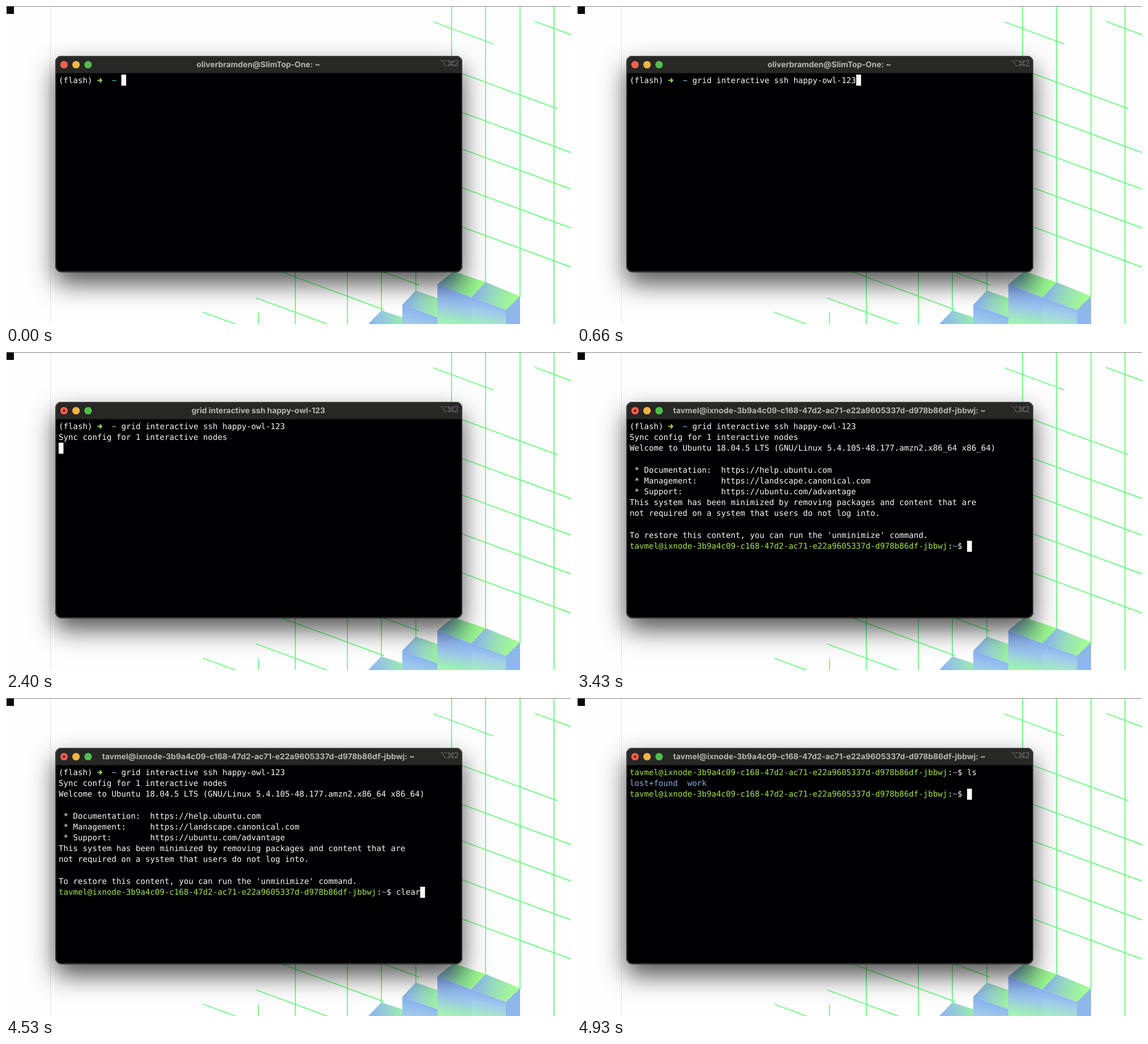
Write an HTML page with a canvas that moves like this. It is 998x561 px and loops after 5460 ms.

```html
<!DOCTYPE html>
<html lang="en">
<head>
<meta charset="utf-8">
<title>Terminal session</title>
<style>
  html, body { margin: 0; width: 100%; height: 100%; overflow: hidden; background: #fefefe; }
  canvas { display: block; }
</style>
</head>
<body>
<canvas id="stage" width="998" height="561"></canvas>
<script>
const W = 998, H = 561, LOOP = 5460;
const LEFT = 93, TOP = 121.4, CELL = 8.515, ROW = 19.2;
const WHITE = '#f8f8f8', LIME = '#a5e545', CYAN = '#5fd3dc', BLUE = '#82addf', GREEN = '#6cfa82';
const MONO = '14.143px "DejaVu Sans Mono", monospace';
const BOLD = '700 13.9px Inter, sans-serif';

const COMMAND = 'grid interactive ssh happy-owl-123';
const HOST = 'tavmel@ixnode-3b9a4c09-c168-47d2-ac71-e22a9605337d-d978b86df-jbbwj';
const WELCOME = [
  'Welcome to Ubuntu 18.04.5 LTS (GNU/Linux 5.4.105-48.177.amzn2.x86_64 x86_64)',
  '',
  ' * Documentation:  https://help.ubuntu.com',
  ' * Management:     https://landscape.canonical.com',
  ' * Support:        https://ubuntu.com/advantage',
  'This system has been minimized by removing packages and content that are',
  'not required on a system that users do not log into.',
  '',
  "To restore this content, you can run the 'unminimize' command."
];

const ctx = document.getElementById('stage').getContext('2d');

function line(c, x1, y1, x2, y2) {
  c.beginPath();
  c.moveTo(x1, y1);
  c.lineTo(x2, y2);
  c.stroke();
}

function disc(c, x, y, r, color) {
  c.fillStyle = color;
  c.beginPath();
  c.arc(x, y, r, 0, Math.PI * 2);
  c.fill();
}

function polygon(c, points, fill) {
  c.fillStyle = fill;
  c.beginPath();
  points.forEach(([x, y]) => c.lineTo(x, y));
  c.closePath();
  c.fill();
}

function blend(c, x1, y1, x2, y2, ...colors) {
  const g = c.createLinearGradient(x1, y1, x2, y2);
  colors.forEach((color, i) => g.addColorStop(i / (colors.length - 1), color));
  return g;
}

function drawGrid(c) {
  c.strokeStyle = GREEN;
  c.lineWidth = 1.8;
  [[787, 0, 100], [847, 0, 490], [908, 0, 514], [968, 0, H], [446, 541, H],
   [511, 460, H], [603, 460, H], [663, 460, 538], [724, 460, 503]]
    .forEach(([x, y1, y2]) => line(c, x, y1, x, y2));

  // Slanted lines: start point and end x on a common slope.
  [[755, 28, 861], [934, 27, W], [790, 113.5, 974], [790, 182, W], [790, 246.5, W],
   [790, 315, W], [790, 384, W], [470, 463, 668], [442, 515, 570], [348, 540, 408], [650, 463, 730]]
    .forEach(([x, y, end]) => line(c, x, y, end, y + (end - x) * 0.368));
}

function drawCubes(c) {
  polygon(c, [[640, H], [663, 537], [700, 549], [700, H]],
    blend(c, 645, 561, 700, 548, '#8eb6ee', '#96cfd6', '#9beeac'));
  polygon(c, [[700, 527], [724, 502], [762, 515], [762, 549]],
    blend(c, 704, 526, 762, 526, '#88b3ee', '#98d7cc', '#9ef2a2'));
  polygon(c, [[700, 527], [762, 549], [762, H], [700, H]],
    blend(c, 725, 530, 718, 561, '#86aff0', '#a0ccea'));
  polygon(c, [[762, 491], [790, 468], [847, 487], [822, 514]],
    blend(c, 768, 485, 838, 495, '#85b9d8', '#8de29c', '#9cfc88'));
  polygon(c, [[762, 491], [822, 514], [822, H], [762, H]],
    blend(c, 794, 498, 783, 561, '#86abf1', '#9bc5ed', '#a3f4b0'));
  polygon(c, [[822, 514], [847, 487], [908, 512], [883, 536]],
    blend(c, 832, 501, 896, 522, '#8ab7e9', '#98deb7', '#a2fb94'));
  polygon(c, [[822, 514], [883, 536], [883, H], [822, H]],
    blend(c, 852, 520, 844, 561, '#88aef0', '#a2cdea', '#a5e9c5'));
  polygon(c, [[883, 536], [908, 512], [908, H], [883, H]],
    blend(c, 900, 516, 892, 561, '#8ab9e3', '#91b6ef'));
}

function drawShortcut(c) {
  c.strokeStyle = '#6e6e6d';
  c.lineWidth = 1.1;
  c.beginPath();
  c.moveTo(767.5, 96.5);
  c.lineTo(771, 96.5);
  c.lineTo(775.5, 105.5);
  c.lineTo(779, 105.5);
  c.moveTo(774, 96.5);
  c.lineTo(779, 96.5);
  c.stroke();
  c.strokeRect(784, 99.2, 3.8, 3.8);
  for (const sx of [-1, 1]) for (const sy of [-1, 1]) {
    c.beginPath();
    c.arc(785.9 + sx * 3.5, 101.1 + sy * 3.5, 1.6, 0, Math.PI * 2);
    c.stroke();
  }
  c.fillStyle = '#6e6e6d';
  c.font = '14px Inter, sans-serif';
  c.fillText('2', 791.5, 106);
}

function drawWindow(c) {
  const frame = (inset, r) => {
    c.beginPath();
    c.roundRect(87 + inset, 88 + inset, 719 - 2 * inset, 381.5 - 2 * inset, r);
  };
  c.save();
  c.shadowColor = 'rgba(0,0,0,.68)';
  c.shadowBlur = 44;
  c.shadowOffsetY = 20;
  c.fillStyle = '#000';
  frame(0, 11);
  c.fill();
  c.restore();

  c.save();
  frame(0, 11);
  c.clip();
  c.fillStyle = '#000002';
  c.fillRect(87, 88, 719, 382);
  c.fillStyle = '#272726';
  c.fillRect(87, 88, 719, 30.5);
  c.restore();
  c.strokeStyle = '#4b4b4b';
  c.lineWidth = 1.2;
  frame(1, 10);
  c.stroke();

  disc(c, 102.5, 103.5, 6.6, '#ed6150');
  disc(c, 123.7, 103.5, 6.6, '#f3b442');
  disc(c, 145, 103.5, 6.6, '#51bd4b');
  drawShortcut(c);
}

function makeBackdrop() {
  const canvas = document.createElement('canvas');
  canvas.width = W;
  canvas.height = H;
  const c = canvas.getContext('2d');
  c.fillStyle = '#fefefe';
  c.fillRect(0, 0, W, H);
  drawGrid(c);
  drawCubes(c);
  c.fillStyle = '#e3e3e3';
  c.fillRect(78, 0, 1, H);
  c.fillStyle = '#838383';
  c.fillRect(0, 0, W, 1);
  c.fillStyle = '#0a0a0a';
  c.fillRect(1, 1, 13, 13);
  drawWindow(c);
  return canvas;
}

function typed(text, t, start, step) {
  return text.slice(0, Math.max(0, Math.floor((t - start) / step) + 1));
}

const plain = text => [[WHITE, text]];
const localPrompt = text => [[WHITE, '(flash) '], [LIME, '➜'], [WHITE, '  '], [CYAN, '~'], [WHITE, ' ' + text]];
const remotePrompt = text => [[LIME, HOST], [WHITE, ':'], [BLUE, '~'], [WHITE, '$ ' + text]];

function screenRows(t) {
  if (t >= 4630) {
    const rows = [remotePrompt(typed('ls', t, 4760, 85))];
    if (t >= 4930) rows.push([[BLUE, 'lost+found  work']], remotePrompt(''));
    return rows;
  }
  const rows = [localPrompt(t >= 660 ? COMMAND : typed('grid', t, 230, 90))];
  if (t >= 2400) rows.push(plain('Sync config for 1 interactive nodes'));
  if (t >= 3430) rows.push(...WELCOME.map(plain), remotePrompt(typed('clear', t, 4200, 82.5)));
  else if (t >= 860) rows.push(plain(''));
  return rows;
}

function drawArrow(x, y) {
  ctx.fillRect(x + 0.5, y - 1, 5, 2);
  polygon(ctx, [[x + 4, y - 4], [x + 5.5, y - 4], [x + 9, y], [x + 5.5, y + 4], [x + 4, y + 4], [x + 5.5, y]], LIME);
}

function drawRow(row, index) {
  const y = TOP + index * ROW;
  let column = 0;
  for (const [color, text] of row) {
    const x = LEFT + column * CELL;
    ctx.fillStyle = color;
    if (text === '➜') drawArrow(x, y + 9.8);
    else ctx.fillText(text, x, y + 14.4);
    column += text.length;
  }
  return column;
}

function drawTitle(t) {
  ctx.font = BOLD;
  ctx.textAlign = 'center';
  ctx.fillStyle = '#b5b5b4';
  const title = t < 860 ? 'oliverbramden@SlimTop-One: ~' : t < 3430 ? COMMAND : HOST + ': ~';
  ctx.fillText(title, 445.7, 108);
}

const backdrop = makeBackdrop();

function draw() {
  const t = performance.now() % LOOP;
  ctx.textRendering = 'geometricPrecision';
  ctx.drawImage(backdrop, 0, 0);
  drawTitle(t);
  if (t >= 1130) disc(ctx, 102.5, 103.5, 2.3, '#7d150c');

  ctx.font = MONO;
  ctx.textAlign = 'left';
  const rows = screenRows(t);
  let column = 0;
  rows.forEach((row, i) => { column = drawRow(row, i); });
  ctx.fillStyle = '#fff';
  ctx.fillRect(LEFT + column * CELL, Math.round(TOP + (rows.length - 1) * ROW), CELL, 19.5);
  requestAnimationFrame(draw);
}

draw();
</script>
</body>
</html>
```
